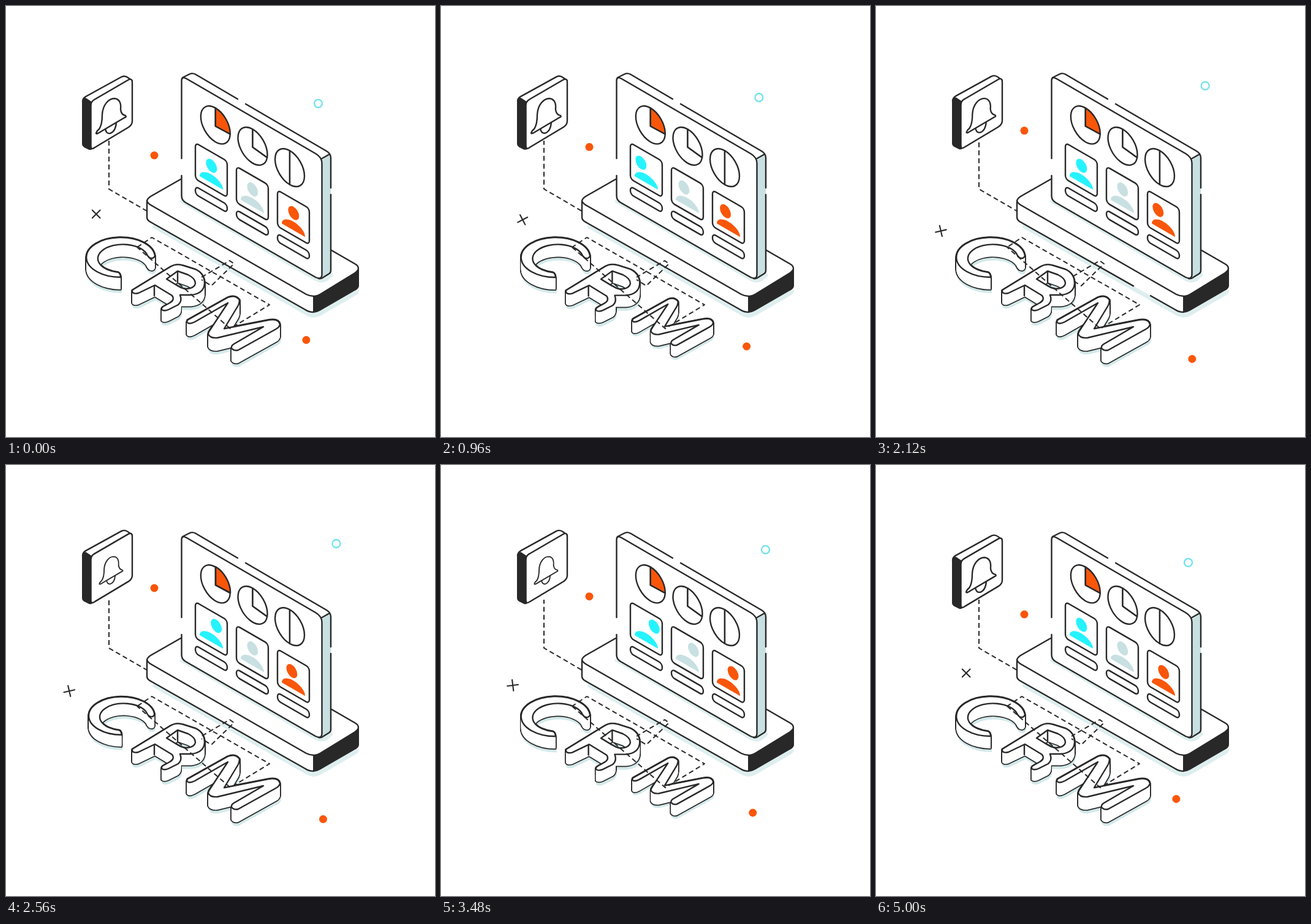
An HTML page with a canvas for the animation above (5040 ms loop, 700 by 704 pixels).

```html
<!DOCTYPE html>
<html lang="en">
<head>
<meta charset="utf-8">
<style>
html, body { margin: 0; width: 100%; height: 100%; overflow: hidden; background: #fff; }
canvas { display: block; }
</style>
</head>
<body>
<canvas id="stage" width="700" height="704"></canvas>
<script>
const ctx = document.getElementById('stage').getContext('2d');
const LOOP = 5040, HALF = LOOP / 2, TAU = Math.PI * 2;
const INK = '#282828', WHITE = '#fff', ORANGE = '#f9560a', CYAN = '#25f3ff';
const MIST = '#c8e0e2', SHADE = '#d3e8e9', PALE = '#deeeee', RING = '#6fe3ea';
const PEN = 2.4;

const smooth = p => p * p * (3 - 2 * p);

// Eased value between [time, value] stops.
function ease(t, stops) {
  if (t <= stops[0][0]) return stops[0][1];
  for (let i = 1; i < stops.length; i++) {
    const [t0, a] = stops[i - 1], [t1, b] = stops[i];
    if (t < t1) return a + (b - a) * smooth((t - t0) / (t1 - t0));
  }
  return stops[stops.length - 1][1];
}

function paint(path, fill, line = INK, width = PEN) {
  const p = typeof path === 'string' ? new Path2D(path) : path;
  if (fill) { ctx.fillStyle = fill; ctx.fill(p, 'evenodd'); }
  if (line) { ctx.strokeStyle = line; ctx.lineWidth = width; ctx.stroke(p); }
}

function at(x, y, draw) {
  ctx.save();
  ctx.translate(x, y);
  draw();
  ctx.restore();
}

// Maps a flat path onto the upright plane of the screen.
function onScreen(x, y, build) {
  const flat = new Path2D(), path = new Path2D();
  build(flat);
  path.addPath(flat, new DOMMatrix([0.866, 0.5, 0, 1, x, y]));
  return path;
}

function disc(x, y, r, fill) {
  ctx.beginPath();
  ctx.arc(x, y, r, 0, TAU);
  ctx.fillStyle = fill;
  ctx.fill();
}

function drawBase(t) {
  at(1, 9, () => paint('M238 353L490 497Q501 503 512 497L569 464Q575 461 575 455L501 470L240 330Z', PALE, null));
  paint('M236 311L394 220L569 421Q580 428 569 436L512 471Q501 477 490 471L236 325Q225 318 236 311Z', WHITE, null);
  paint('M230 318Q231 322 236 325L490 471Q496 474 502 474V500Q495 500 490 497L236 353Q230 350 230 345Z', WHITE, null);
  paint('M502 474Q507 474 512 471L569 436Q575 432 575 428V457Q575 461 569 464L512 497Q507 500 502 500Z', INK, INK, 2);
  paint('M285 283L236 311Q230 315 230 319V345Q230 350 236 353M230 318Q231 322 236 325L490 471Q496 474 502 474M531 399L569 421Q575 424 575 429M490 497Q495 500 502 500');

  const edgeY = x => 353 + (x - 236) * 144 / 254;
  const clamp = x => Math.max(236, Math.min(490, x));
  const mid = 274 + 0.235 * (t % HALF - 1440);
  const from = clamp(mid - 14), to = clamp(mid + 14);
  ctx.beginPath();
  ctx.moveTo(236, 353);
  ctx.lineTo(from, edgeY(from));
  ctx.moveTo(to, edgeY(to));
  ctx.lineTo(490, 497);
  ctx.stroke();
}

function drawPanel() {
  paint('M287 314L283 320L505 449Q515 454 524 449L534 440L528 430Z', PALE, null);
  paint('M287 118L300 111Q304 109 309 111.5L523 237Q530 241 530 248V432Q530 436 526 438L515 445L400 300Z', WHITE, null);
  paint('M515 252L528 242Q530 244 530 248V432Q530 436 526 438L515 445Z', MIST, null);
  paint('M286.5 122Q286.5 114 295 119L505 241Q515.5 247 515.5 257V438Q515.5 448 505 443L293 321Q286.5 317 286.5 310Z', WHITE, null);
  paint('M286.5 249V122Q286.5 114 295 119L505 241Q515.5 247 515.5 257V438Q515.5 448 505 443L293 321Q286.5 317 286.5 310V277');
  paint('M288 117L300 111Q304 109 309 111.5L378 152M391 160L523 237Q530 241 530 248V297M530 308V432Q530 436 526 438L518 443Q515 446 510 445M514 250L528 242');
}

function drawPie(x, y, start, end, fill, dx, dy, open, sink = 0) {
  const R = 27.7;
  const wedge = (a, b) => onScreen(x, y, p => {
    p.moveTo(0, sink);
    p.arc(0, 0, R, a, b);
    p.closePath();
  });
  paint(wedge(end, start + TAU), WHITE);
  at(dx * open, dy * open, () => paint(wedge(start, end), fill));
}

function drawPies(t) {
  const up = -Math.PI / 2;
  const open = delay => ease(t % HALF - delay, [[0, 0], [300, 1], [430, 1], [850, 0]]);
  drawPie(341.8, 194.3, up, 0.04, ORANGE, 6, -6.3, open(0), 2);
  drawPie(402.5, 229, up, 0.18, WHITE, 8, -5.5, open(90), 1.5);
  drawPie(463, 264, up, Math.PI / 2, WHITE, 9.5, 2.5, open(90));
}

function drawContact(i, color, sway) {
  const x = 309 + 67 * i, y = 223.5 + 38.6 * i;
  paint(onScreen(x, y, p => p.roundRect(0, 0, 60, 59, 6)), WHITE);
  paint(onScreen(x, y + 71, p => p.roundRect(0, 0, 60, 13, 6)), WHITE);
  paint(onScreen(x + 26, y + 65.5, p => p.ellipse(0, 0, 22, 14, 0, Math.PI, TAU)), color, null);
  const dx = sway < 0 ? 9 * sway : 12.5 * sway, dy = sway < 0 ? 5 * sway : 3 * sway;
  paint(onScreen(x + 26.3 + dx, y + 37.5 + dy, p => p.arc(0, 0, 10.3, 0, TAU)), color, null);
}

function drawContacts(t) {
  drawContact(0, CYAN, ease(t, [[0, 0], [480, -1], [1480, -1], [2080, 0], [2140, 0], [2860, 1], [4150, 1], [4850, 0]]));
  drawContact(1, MIST, ease(t, [[600, 0], [1200, -1], [1480, -1], [2090, 0], [3000, 0], [3700, 1], [4200, 1], [4900, 0]]));
  drawContact(2, ORANGE, ease(t, [[600, 0], [1250, -1], [2140, -1], [2820, 0], [3080, 0], [3800, 1], [4200, 1], [5000, 0]]));
}

function drawBell(t) {
  const lift = (1 - Math.cos(TAU * 5 * t / LOOP)) / 2;
  at(0, -8 * lift, () => {
    paint('M125 156Q125 151 130 148L188 116Q194 113 199 117L206 122L139 165Z', WHITE);
    paint('M125 155Q126 151 130 151L139 157V234L136 234L128 230Q125 228 125 225Z', INK, INK, 2);
    paint('M138.5 163Q138.5 156 144 153L199 121Q206 117 206 125V188Q206 194 200 198L145 231Q138.5 236 138.5 228Z', WHITE);
    at(171.5, 181, () => {
      const s = 1 - 0.22 * lift;
      ctx.scale(s, s);
      ctx.translate(-171.5, -181);
      paint('M162 200Q163 209 170 208Q179 205 180 190', WHITE);
      paint('M147 208Q148 204 152 201Q157 194 157 177C158 162 167 151 177 151C186 152 188 160 187 169Q188 178 195 179Q197 181 194 182L150 208Q147 209 147 208Z', WHITE);
    });
  });
}

const letters = [
  { depth: 20, delay: 0, x: 225, y: 390, folds: '',
    path: 'M187 443A56 32.5 0 1 1 243 408Q241 414 234 411Q231 409 229 404A41 23 0 1 0 183 435Q187 437 187 443Z' },
  { depth: 18.5, delay: 250, x: 311, y: 439, folds: 'M280 433V451M242 456V473',
    path: 'M206 464L268 426Q278 420 290 424L309 430Q324 437 324 453Q323 470 302 472L284 472Q288 482 281 488L265 496Q258 499 254 496Q253 492 258 490L267 485Q276 480 271 473L243 456L216 469Q208 471 206 467ZM262 446L280 433L297 439Q309 445 309 453Q307 462 292 462Q286 461 280 457Z' },
  { depth: 21, delay: 520, x: 425, y: 500, folds: '',
    path: 'M296 513L362 476Q374 471 381 480Q381 485 379 489L356 527L428 513Q445 510 447 520Q446 525 440 528L379 562Q372 564 368 559Q367 555 372 552L420 524L345 542Q333 543 330 536Q330 533 333 529L362 485L308 516Q298 521 295 516Z' }
];

function drawLetter({ depth, delay, x, y, folds, path }, t) {
  const shape = new Path2D(path);
  const s = ease(t % HALF - delay, [[0, 1], [150, 0.775], [390, 0.885], [540, 0.825],
    [700, 1.02], [900, 1.003], [1100, 1.012], [1400, 1]]);
  const slide = (fill, line) => {
    for (let d = depth; d >= 0; d--) at(0, d, () => paint(shape, fill, line, 3.4 / s));
  };
  ctx.save();
  ctx.translate(x, y);
  ctx.scale(s, s);
  ctx.translate(-x, -y);
  at(1, depth + 5, () => paint(shape, SHADE, SHADE, 2));
  slide(INK, INK);
  slide(WHITE, null);
  paint(folds, null, INK, PEN / s);
  paint(shape, WHITE, INK, PEN / s);
  ctx.restore();
}

function drawDashes(path, t) {
  ctx.save();
  ctx.lineCap = 'butt';
  ctx.setLineDash([8, 5]);
  ctx.lineDashOffset = -130 * t / LOOP;
  paint(path, null, INK, 2);
  ctx.restore();
}

function drawFloaters(t) {
  const c = Math.cos(TAU * t / LOOP);
  disc(242, 222.5 + 21.5 * c, 6.5, ORANGE);
  disc(503.7 - 13.8 * c, 562 - 16.5 * c, 6.5, ORANGE);
  ctx.beginPath();
  ctx.arc(524.2 - 14.7 * c, 143.9 + 15.4 * c, 6.5, 0, TAU);
  ctx.strokeStyle = RING;
  ctx.lineWidth = 2.3;
  ctx.stroke();
  const turn = ease(t, [[0, 0], [520, 17], [1440, 18], [2120, 32], [2920, 32], [4120, 45], [5000, 90]]);
  at(125.2 + 22 * c, 354.5 - 14.7 * c, () => {
    ctx.rotate((45 + turn) * Math.PI / 180);
    paint('M-9 0H9M0 -9V9', null, INK, 2.1);
  });
}

function draw(t) {
  ctx.fillStyle = WHITE;
  ctx.fillRect(0, 0, 700, 704);
  ctx.lineCap = ctx.lineJoin = 'round';
  drawBase(t);
  drawPanel();
  drawPies(t);
  drawContacts(t);
  drawDashes('M168 220V299L230 335', t);
  drawBell(t);
  for (const letter of letters) drawLetter(letter, t);
  drawDashes('M214 394L238 378L430 488L366 527Z', t);
  drawDashes('M319 443L365 416L372 421L335 457L319 447', t);
  drawFloaters(t);
}

const begin = performance.now();
function tick() {
  draw((performance.now() - begin) % LOOP);
  requestAnimationFrame(tick);
}
tick();
</script>
</body>
</html>
```
